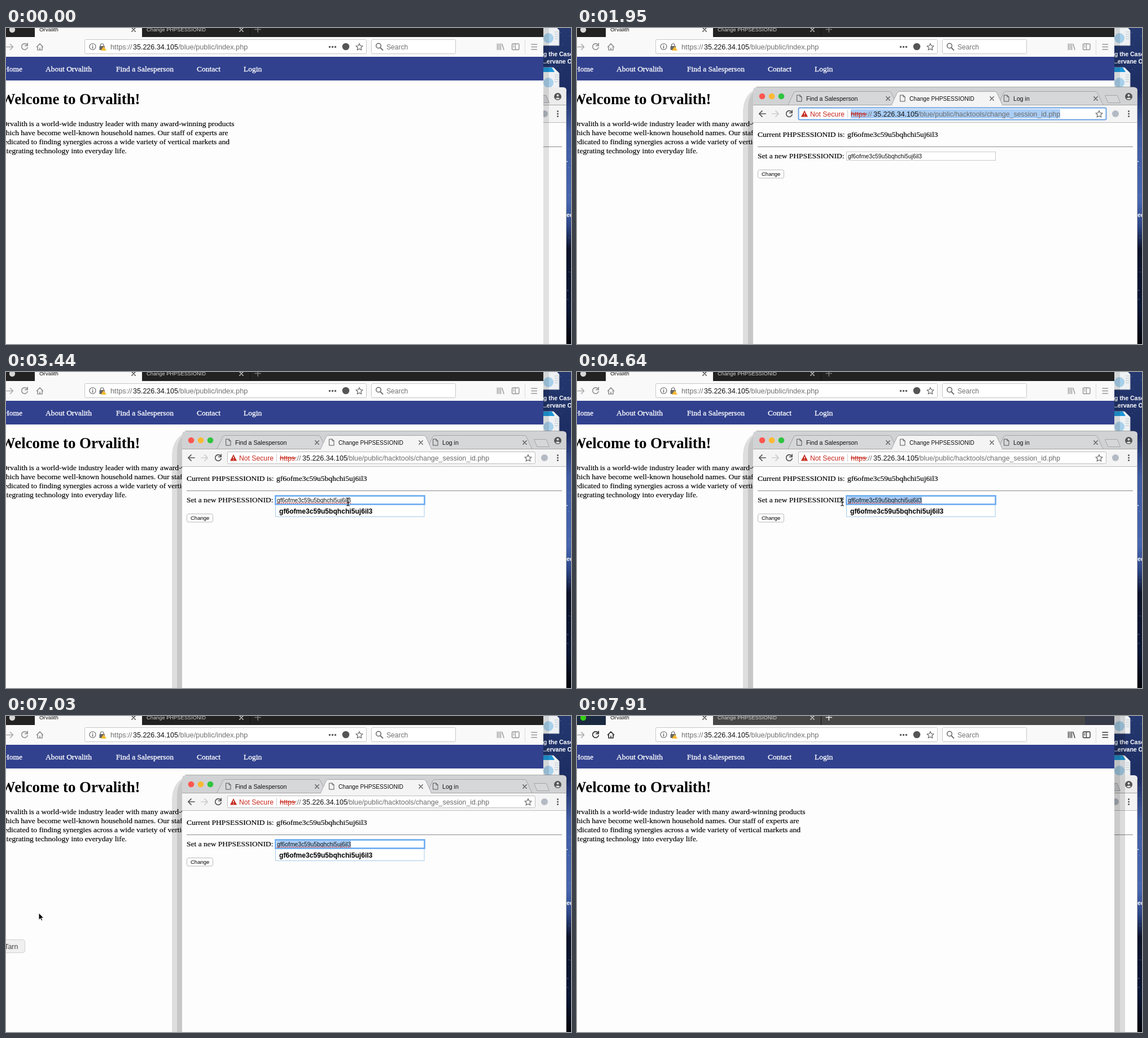
Animation, 1001 px wide and 560 px high, one loop 8000 ms. Source, as an HTML page:

```html
<!DOCTYPE html>
<html lang="en">
<head>
<meta charset="utf-8">
<title>Session change demo</title>
<style>
html, body { margin: 0; width: 100%; height: 100%; overflow: hidden; background: #fff; }
svg { display: block; width: 1001px; height: 560px; font-family: "Liberation Sans", sans-serif; }
.serif { font-family: "Liberation Serif", serif; font-size: 13.5px; }
.heading { font-size: 26.9px; font-weight: bold; }
.end { text-anchor: end; }
.line { fill: none; stroke-linecap: round; stroke-linejoin: round; }
</style>
</head>
<body>
<svg viewBox="0 0 1001 560" xmlns="http://www.w3.org/2000/svg">
  <defs>
    <linearGradient id="sky" x1="0" y1="0" x2="0" y2="1">
      <stop offset="0" stop-color="#24386f"/>
      <stop offset=".2" stop-color="#1d2d63"/>
      <stop offset=".33" stop-color="#405ca4"/>
      <stop offset=".55" stop-color="#4766b0"/>
      <stop offset=".63" stop-color="#2c4484"/>
      <stop offset=".7" stop-color="#0c1228"/>
      <stop offset=".88" stop-color="#0a1634"/>
      <stop offset="1" stop-color="#02040a"/>
    </linearGradient>
    <path id="close" class="line" d="M-3.2-3.2L3.2 3.2M3.2-3.2L-3.2 3.2" stroke-width="1.3"/>
    <path id="page" class="line" d="M-4-5.5H1L4-2.5V5.5H-4ZM1-5.5V-2.5H4" stroke="#555"/>
    <path id="reload" class="line" d="M4.2-3.4A5.4 5.4 0 1 0 5.2 1.6M5.2-6V-1.6H.8" stroke-width="1.7"/>
    <path id="star" class="line" d="M0-6L1.8-2L6-1.6L2.9 1.3L3.8 5.6L0 3.4L-3.8 5.6L-2.9 1.3L-6-1.6L-1.8-2Z"/>
  </defs>

  <g id="desktop">
    <rect x="940" width="61" height="560" fill="url(#sky)"/>
    <g id="stars" fill="#b9c7ea"></g>
    <g id="files"></g>
    <g fill="#fff" font-size="10.5" font-weight="bold">
      <text x="952" y="50">g the Case</text>
      <text x="952" y="63">..ervane O</text>
      <text x="993" y="335">ed</text>
      <text x="992" y="239">-</text>
    </g>
  </g>

  <g id="firefox">
    <rect id="nearShadow" x="952" width="10" height="560"/>
    <rect id="wideShadow" x="962" width="9" height="560" opacity=".13"/>
    <rect width="952" height="560" fill="#fdfdfd"/>
    <rect id="strip" width="952" height="16"/>
    <rect id="stripLeft" width="51" height="16"/>
    <rect id="stripRight" x="900" width="52" height="16"/>
    <circle id="light" cx="11" cy="3" r="5.2"/>
    <rect x="51" width="190" height="16" fill="#f9f9fa"/>
    <text x="59" y="6" font-size="9.8" fill="#111">Orvalith</text>
    <text x="249" y="6" font-size="9.3" fill="#d2d2d2">Change PHPSESSIONID</text>
    <use href="#close" x="226" y="3" stroke="#333"/>
    <use href="#close" x="417" y="3" stroke="#ddd"/>
    <path d="M432.5 0V16" stroke="#111"/>
    <path id="plus" d="M440.5 2.5H452M446.3 0V8" stroke-width="1.6"/>
    <rect y="16" width="952" height="35" fill="#f9f9fa"/>
    <path class="line" d="M1 33.5H12M7.5 28.5L12.5 33.5L7.5 38.5" stroke="#aaa" stroke-width="1.5"/>
    <g id="tools" class="line">
      <use href="#reload" x="33" y="33"/>
      <path d="M54.5 33.5L60 27.8L65.5 33.5M56 32.5V39H64V32.5M60 39V35.5" stroke-width="1.7"/>
      <path d="M870.5 28V38.5M873.5 28V38.5M876.5 28V38.5M879 28.5L882 38.5" stroke-width="1.4"/>
      <rect x="896.5" y="28" width="12.5" height="10.5" rx="1.5" stroke-width="1.4"/>
      <path d="M902.5 28V38.5M898.5 31H900.5M898.5 33.5H900.5" stroke-width="1.2"/>
      <path d="M931 29H940.5M931 33.5H940.5M931 38H940.5" stroke-width="1.5"/>
    </g>
    <path d="M919.5 20V47" stroke="#ddd"/>
    <g fill="#fff" stroke="#c8c8c8">
      <rect x="139.5" y="20.5" width="499" height="25" rx="2"/>
      <rect x="647.5" y="20.5" width="149" height="25" rx="2"/>
    </g>
    <g class="line" stroke="#666" stroke-width="1.2">
      <circle cx="153.5" cy="33" r="5.5"/>
      <path d="M153.5 32.5V36M153.5 30V30.2" stroke-width="1.5"/>
      <path d="M167.5 32V30A2.8 2.8 0 0 1 173 30V32"/>
      <use href="#star" x="626" y="33.5"/>
      <circle cx="660" cy="31.5" r="4.3" stroke-width="1.5"/>
      <path d="M663.3 35L667.5 39.2" stroke-width="1.8"/>
    </g>
    <rect x="165.5" y="32" width="9.5" height="7" rx="1" fill="#666"/>
    <path d="M173 32.5L178 40H168Z" fill="#f5b82e"/>
    <g fill="#555">
      <circle cx="573.5" cy="33.5" r="1.7"/><circle cx="578.5" cy="33.5" r="1.7"/><circle cx="583.5" cy="33.5" r="1.7"/>
      <circle cx="602" cy="33" r="6.3"/>
    </g>
    <g font-size="12.75" fill="#707070">
      <text x="185" y="38">https://</text>
      <text x="225" y="38" fill="#111" font-size="12.5">35.226.34.105</text>
      <text x="305" y="38">/blue/public/index.php</text>
      <text x="674" y="38" font-size="12.1">Search</text>
    </g>
    <rect y="51" width="952" height="42" fill="#31418e"/>
    <g class="serif" fill="#fff" stroke="#fff" stroke-width=".3">
      <text x="29" y="77" class="end">Home</text>
      <text x="70" y="77">About Orvalith</text>
      <text x="195" y="77">Find a Salesperson</text>
      <text x="338" y="77">Contact</text>
      <text x="421" y="77">Login</text>
    </g>
    <g class="serif heading">
      <text x="123.5" y="135" class="end">Welcome to</text>
      <text x="130" y="135">Orvalith!</text>
    </g>
    <g class="serif end" stroke="#000" stroke-width=".18">
      <text x="38" y="174">Orvalith</text>
      <text x="404.5" y="174">is a world-wide industry leader with many award-winning products</text>
      <text x="393.5" y="190">which have become well-known household names. Our staff of experts are</text>
      <text x="396" y="206">dedicated to finding synergies across a wide variety of vertical markets and</text>
      <text x="214" y="222">integrating technology into everyday life.</text>
    </g>
  </g>

  <g id="chrome">
    <g id="chromeShadow">
      <path d="M294 560V146Q296 113 325 105H340V560Z" opacity=".12"/>
      <path d="M303 560V140Q304 113 325 105H340V560Z" opacity=".1"/>
      <path d="M318 104.5H988" stroke="#777" opacity=".6"/>
    </g>
    <path id="tabStrip" d="M312 560V111Q312 105 318 105H987Q993 105 993 111V560Z"/>
    <g fill="#d6d7d9" stroke="#a5a5a8">
      <path d="M746 136L756 115Q757 112.5 760 112.5H918Q921 112.5 922 115L932 136"/>
      <path d="M374 136L384 115Q385 112.5 388 112.5H553Q556 112.5 557 115L567 136"/>
      <path d="M935.5 119.5H957L962.5 132.5H941Z"/>
      <path d="M312 136.5H993"/>
      <path d="M557 137L567 115Q568 112.5 571 112.5H740Q743 112.5 744 115L754 137" fill="#f4f4f4"/>
    </g>
    <rect x="312" y="137" width="681" height="31" fill="#f4f4f4"/>
    <rect x="312" y="168" width="681" height="392" fill="#fdfdfd"/>
    <path d="M312 167.5H993" stroke="#bcbcbc"/>
    <path d="M992.5 112V560" stroke="#b5b5b5"/>
    <circle cx="328" cy="121" r="5.3" fill="#fc5650"/>
    <circle cx="345" cy="121" r="5.3" fill="#fdb932"/>
    <circle cx="362" cy="121" r="5.3" fill="#2fc43f"/>
    <use href="#page" x="394" y="124.5"/><use href="#page" x="577" y="124.5"/><use href="#page" x="761" y="124.5"/>
    <g font-size="10.6" fill="#111">
      <text x="406" y="128.5">Find a Salesperson</text>
      <text x="589" y="128.5" font-size="10.2">Change PHPSESSIONID</text>
      <text x="773" y="128.5">Log in</text>
    </g>
    <g stroke="#555"><use href="#close" x="551" y="125"/><use href="#close" x="735" y="125"/><use href="#close" x="919" y="125"/></g>
    <circle cx="977.5" cy="121.5" r="6.5" fill="#555"/>
    <circle cx="977.5" cy="119.5" r="2" fill="#ddd"/>
    <path d="M973.5 125Q977.5 121.5 981.5 125Q977.5 128.5 973.5 125" fill="#ddd"/>
    <g class="line" stroke-width="1.7">
      <path d="M334 152H323M328 146.8L322.8 152L328 157.2" stroke="#555"/>
      <path d="M346 152H357M352 146.8L357.2 152L352 157.2" stroke="#ccc"/>
      <use href="#reload" x="376" y="152" stroke="#555"/>
    </g>
    <rect id="omnibox" x="392.5" y="141.5" width="545" height="21" rx="2" fill="#fff"/>
    <rect id="urlSelection" x="485" y="144" width="371" height="16" fill="#a9cdf5"/>
    <path d="M403 146L409 157.5H397Z" fill="#c5281c"/>
    <path d="M403 150V153.5M403 155V156.2" stroke="#fff" stroke-width="1.3"/>
    <path d="M479.5 145V159" stroke="#ccc"/>
    <g font-size="12.5" fill="#6c6c6c">
      <text x="413" y="156.5" fill="#c5281c" font-size="12.2">Not Secure</text>
      <text x="485" y="156.5"><tspan fill="#c5281c">https</tspan>://</text>
      <text x="525" y="156.5" fill="#111">35.226.34.105</text>
      <text x="604" y="156.5" font-size="12.4">/blue/public/hacktools/change_session_id.php</text>
    </g>
    <path d="M485 152.5H514" stroke="#c5281c" stroke-width="1.2"/>
    <use href="#star" x="925" y="152.5" stroke="#666" stroke-width="1.2"/>
    <circle cx="954" cy="152" r="6" fill="#b4bac4"/>
    <g fill="#555"><circle cx="977.5" cy="147.5" r="1.5"/><circle cx="977.5" cy="152" r="1.5"/><circle cx="977.5" cy="156.5" r="1.5"/></g>

    <g class="serif" stroke="#000" stroke-width=".18">
      <text x="320" y="193">Current PHPSESSIONID is:</text>
      <text x="479" y="193">gf6ofme3c59u5bqhchi5uj6il3</text>
      <text x="320" y="231">Set a new PHPSESSIONID:</text>
    </g>
    <path d="M320 210.5H985" stroke="#8b8b8b"/>
    <rect id="field" x="477.5" y="219.5" width="264" height="15" fill="#fff"/>
    <rect id="fieldSelection" y="221" height="12" fill="#a9cdf5"/>
    <text x="480" y="231" font-size="10.3" fill="#111">gf6ofme3c59u5bqhchi5uj6il3</text>
    <path id="spelling" d="M480 232.5H611" stroke="#e0443c" stroke-width="1.3" stroke-dasharray="2 1.5"/>
    <rect x="320.5" y="251.5" width="46" height="14.5" rx="3" fill="#fff" stroke="#b9b9b9"/>
    <text x="327" y="262" font-size="9.5">Change</text>
    <g id="suggestion">
      <path d="M477.5 236V256.5H741V236" fill="#fff" stroke="#a3cbea"/>
      <text x="484" y="251" font-size="12.1" font-weight="bold">gf6ofme3c59u5bqhchi5uj6il3</text>
    </g>
  </g>

  <g id="dockLabel">
    <rect x="-20" y="-11.5" width="53.5" height="23" rx="4" fill="#f0f0f0" stroke="#cfcfcf"/>
    <text x="21.5" y="4.5" class="end" font-size="12.5" fill="#444">Tarn</text>
  </g>
  <path id="arrow" d="M0 0V12.5L2.9 9.8L4.8 14L6.8 13.1L4.9 9H8.8Z" stroke="#fff"/>
  <path id="beam" class="line" d="M-2.5-7Q0-7 0-5V5Q0 7-2.5 7M2.5-7Q0-7 0-5V5Q0 7 2.5 7M-1.5 1.5H1.5" stroke="#222" stroke-width="1.2"/>
</svg>
<script>
const LOOP = 8000;
const el = Object.fromEntries([...document.querySelectorAll("[id]")].map(n => [n.id, n]));
const set = (node, attrs) => { for (const k in attrs) node.setAttribute(k, attrs[k]); };
const show = (node, on) => node.setAttribute("visibility", on ? "visible" : "hidden");

let seed = 7;
const random = () => (seed = seed * 16807 % 2147483647) / 2147483647;
el.stars.innerHTML = Array.from({ length: 90 }, () =>
  `<circle cx="${952 + random() * 49}" cy="${random() * 540}" r="${.3 + random() * .5}" opacity="${.2 + random() * .5}"/>`).join("");

const file = (y, height, tint) => `<g transform="translate(0 ${y})">
  <path d="M940 0H970L980 10V${height}H940Z" fill="#eef1f3" stroke="#b9bec4"/>
  <path d="M940 0H967L972 8H940Z" fill="${tint}"/>
  <circle cx="961" cy="${height - 13}" r="9" fill="#a8d0ea"/>
  ${[13, 17, 21, 25].map(v => `<path d="M972 ${v}H978" stroke="#b7c3cc"/>`).join("")}</g>`;
el.files.innerHTML = file(-6, 37, "#eef1f3") + file(70, 40, "#1f97d6");

// Pointer cues: time, shape, x, y. Without a shape the pointer is hidden.
const pointerCues = [
  [0], [750, "arrow", 2, 478], [900],
  [2400, "arrow", 355, 522], [2550, "arrow", 376, 476], [2700, "arrow", 428, 397],
  [2850, "arrow", 500, 312], [3000, "arrow", 566, 252], [3150, "beam", 600, 232], [3290, "beam", 606, 230],
  [3890, "beam", 620, 230], [4040, "beam", 637, 230], [4190, "beam", 606, 230],
  [4340, "beam", 562, 230], [4490, "beam", 514, 230], [4640, "beam", 470, 230], [4780, "beam", 448, 229],
  [5830, "beam", 335.5, 223], [5980, "arrow", 262, 280], [6130, "arrow", 194, 335], [6280],
  [7030, "arrow", 58, 349], [7170, "arrow", 36, 384], [7320]
];
const labelCues = [[0], [6580, 540], [6730, 496], [6880, 452], [7030, 408], [7320, 452], [7470, 496], [7620]];
const cueAt = (cues, t) => cues.findLast(c => c[0] <= t);

let chromeOnTop = true;
function stack(onTop) {
  if (onTop === chromeOnTop) return;
  chromeOnTop = onTop;
  onTop ? el.firefox.after(el.chrome) : el.firefox.before(el.chrome);
}

function drawWindows(t) {
  const chromeFront = t >= 1950 && t < 7910;
  const active = t >= 450 && !chromeFront;
  stack(chromeFront);
  show(el.chromeShadow, chromeFront);
  set(el.tabStrip, { fill: chromeFront ? "#d1d2d4" : "#ececec" });
  set(el.strip, { fill: active ? "#474747" : "#222" });
  set(el.stripLeft, { fill: active ? "#1b2940" : "#222" });
  set(el.stripRight, { fill: active ? "#363a49" : "#222" });
  set(el.light, { fill: active ? "#36cf15" : "#d6d6d6" });
  set(el.plus, { stroke: active ? "#eee" : "#777" });
  set(el.tools, { stroke: active ? "#333" : "#969696" });
  set(el.nearShadow, { opacity: active ? .2 : .11 });
  show(el.wideShadow, active);
}

function drawForm(t, x) {
  const focused = t >= 3290;
  set(el.omnibox, { stroke: focused ? "#bdbdbd" : "#6ca3e3", "stroke-width": focused ? 1 : 2 });
  show(el.urlSelection, !focused);
  set(el.field, { stroke: focused ? "#6aabf0" : "#c9c9c9", "stroke-width": focused ? 2.6 : 1 });
  show(el.spelling, focused);
  show(el.suggestion, t >= 3440);
  const left = t < 4190 ? 611 : t < 4780 ? Math.max(480, x) : 480;
  set(el.fieldSelection, { x: left, width: 611 - left });
}

function draw(t) {
  const [, shape, x, y] = cueAt(pointerCues, t);
  const [, labelY] = cueAt(labelCues, t);
  drawWindows(t);
  drawForm(t, x);
  for (const name of ["arrow", "beam"]) {
    show(el[name], shape === name);
    if (shape === name) set(el[name], { transform: `translate(${x} ${y})` });
  }
  show(el.dockLabel, labelY !== undefined);
  if (labelY) set(el.dockLabel, { transform: `translate(0 ${labelY})` });
}

const start = performance.now();
function tick() {
  draw((performance.now() - start) % LOOP);
  requestAnimationFrame(tick);
}
tick();
</script>
</body>
</html>
```
